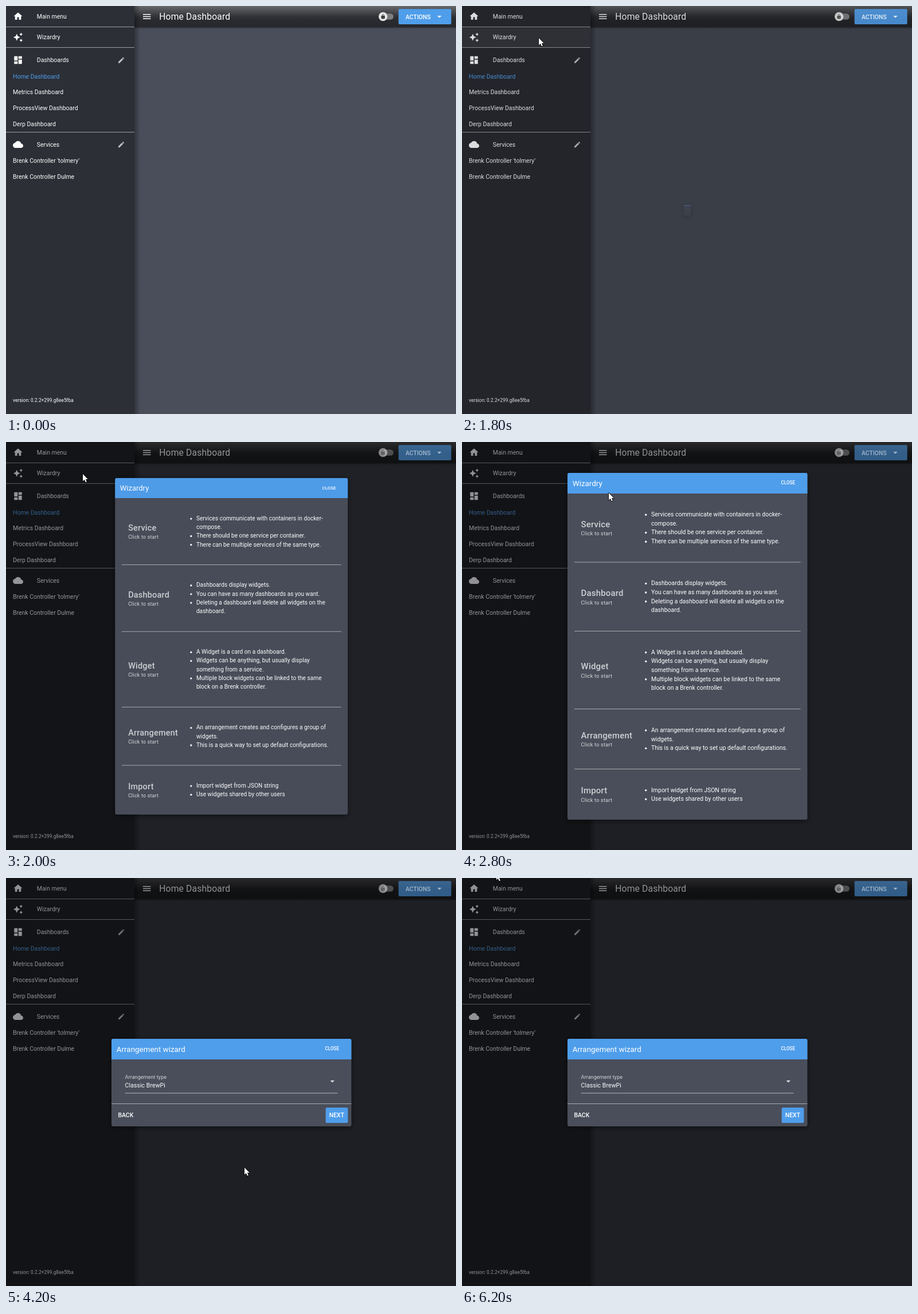
An HTML page with a canvas that plays this animation: 785 px wide and 713 px high, repeating every 6.3 s.

```html
<!DOCTYPE html>
<html lang="en">
<head>
<meta charset="utf-8">
<title>Dashboard wizard</title>
<style>
html, body { margin: 0; width: 100%; height: 100%; overflow: hidden; background: #494e5a; }
canvas { display: block; }
</style>
</head>
<body>
<canvas id="stage" width="785" height="713"></canvas>
<script>
const ctx = document.getElementById('stage').getContext('2d');
const W = 785, H = 713, LOOP = 6300, STEP = 100;
const BLUE = '#4f9eeb', PANEL = '#494e5a', SIDE = '#2c2f36', LINE = 'rgba(255,255,255,.53)';
const BODY = 10.46;

const icons = {
  home: 'M10 20v-6h4v6h5v-8h3L12 3 2 12h3v8z',
  magic: 'M19 9l1.25-2.75L23 5l-2.75-1.25L19 1l-1.25 2.75L15 5l2.75 1.25zM11.5 9.5L9 4 6.5 9.5 1 12l5.5 2.5L9 20l2.5-5.5L17 12zM19 15l-1.25 2.75L15 19l2.75 1.25L19 23l1.25-2.75L23 19l-2.75-1.25z',
  tiles: 'M3 13h8V3H3zM3 21h8v-6H3zM13 21h8V11h-8zM13 3v6h8V3z',
  cloud: 'M19.35 10.04C18.67 6.59 15.64 4 12 4 9.11 4 6.6 5.64 5.35 8.04 2.34 8.36 0 10.91 0 14c0 3.31 2.69 6 6 6h13c2.76 0 5-2.24 5-5 0-2.64-2.05-4.78-4.65-4.96z',
  pencil: 'M3 17.25V21h3.75L17.81 9.94l-3.75-3.75zM20.71 7.04c.39-.39.39-1.02 0-1.41l-2.34-2.34c-.39-.39-1.02-.39-1.41 0l-1.83 1.83 3.75 3.75z',
  menu: 'M3 18h18v-2H3zM3 13h18v-2H3zM3 6v2h18V6z',
  caret: 'M7 10l5 5 5-5z',
  lock: 'M18 8h-1V6a5 5 0 0 0-10 0v2H6a2 2 0 0 0-2 2v10a2 2 0 0 0 2 2h12a2 2 0 0 0 2-2V10a2 2 0 0 0-2-2zM8.9 8V6a3.1 3.1 0 0 1 6.2 0v2zM12 13a2 2 0 0 0 0 4 2 2 0 0 0 0-4z'
};
for (const name in icons) icons[name] = new Path2D(icons[name]);

const arrowShape = new Path2D('M0 0V12.4L2.8 9.8 4.8 14.3 6.9 13.4 5 9H8.8Z');
const handShape = new Path2D('M-1.6 8.4V1.3C-1.6-.5 1.2-.5 1.2 1.3V5.4C2 4.8 3 4.8 3.4 5.8 4.6 5.2 5.2 5.6 5.5 6.4 7 6 7.6 6.6 7.6 7.8V10.6C7.6 12.4 6.4 13 6.4 15H-.5C-.5 13-4.8 9.8-4.8 8.2-4.8 6.8-3 6.8-1.6 8.4Z');

const rows = [
  { name: 'Service', top: 90, bottom: 210, list: ['*Services communicate with containers in docker-', 'compose.', '*There should be one service per container.', '*There can be multiple services of the same type.'] },
  { name: 'Dashboard', top: 210, bottom: 330.4, list: ['*Dashboards display widgets.', '*You can have as many dashboards as you want.', '*Deleting a dashboard will delete all widgets on the', 'dashboard.'] },
  { name: 'Widget', top: 330.4, bottom: 466.4, list: ['*A Widget is a card on a dashboard.', '*Widgets can be anything, but usually display', 'something from a service.', '*Multiple block widgets can be linked to the same', 'block on a Brenk controller.'] },
  { name: 'Arrangement', top: 466.4, bottom: 571.5, list: ['*An arrangement creates and configures a group of', 'widgets.', '*This is a quick way to set up default configurations.'] },
  { name: 'Import', top: 571.5, bottom: 660, list: ['*Import widget from JSON string', '*Use widgets shared by other users'] }
];

// time, x, y, pointing hand
const cursorKeys = [
  [1100, 134, 56, 1], [1800, 134, 56, 0], [2800, 256, 89, 0], [2900, 288, 146, 1],
  [3100, 355, 321, 1], [3300, 394, 430, 1], [3400, 415, 497, 1], [3600, 416, 506, 1],
  [4200, 416, 506, 0], [5000, 429, 492, 0], [5100, 439, 480, 0], [5300, 385, 398, 0],
  [5500, 305, 304, 0], [5700, 230, 189, 0], [5900, 134, 70, 0], [6200, 60, -9, 0]
];

// time, backdrop, dialog scale, dialog opacity
const openKeys = [[0, 0, 0, 0], [1800, .35, .03, .4], [1900, .83, .82, .92], [2000, .97, .97, .98], [2100, 1, 1, 1]];

const at = (keys, t) => keys.filter(k => k[0] <= t).pop();
const ramp = (t, a, b) => Math.min(1, Math.max(0, (t - a) / (b - a)));

function rect(x, y, w, h, fill, r = 0) {
  ctx.fillStyle = fill;
  ctx.beginPath();
  ctx.roundRect(x, y, w, h, r);
  ctx.fill();
}

// y is the middle of the capitals
function text(s, x, y, size = BODY, { color = '#fff', weight = 400, gap = 0 } = {}) {
  ctx.font = `${weight} ${size}px Roboto, sans-serif`;
  ctx.letterSpacing = gap + 'px';
  ctx.fillStyle = color;
  ctx.fillText(s, x, y + size * .355);
}

function icon(name, x, y, size = 18, color = '#fff') {
  ctx.save();
  ctx.translate(x - size / 2, y - size / 2);
  ctx.scale(size / 24, size / 24);
  ctx.fillStyle = color;
  ctx.fill(icons[name], 'evenodd');
  ctx.restore();
}

function gradient(x0, y0, x1, y1, ...stops) {
  const g = ctx.createLinearGradient(x0, y0, x1, y1);
  stops.forEach(([p, c]) => g.addColorStop(p, c));
  return g;
}

function backgrounds(t) {
  rect(0, 0, W, H, PANEL);
  rect(224, 37, W - 224, 4, gradient(0, 37, 0, 41, [0, 'rgba(0,0,0,.2)'], [1, 'rgba(0,0,0,0)']));
  rect(224, 0, W - 224, 37.5, gradient(0, 0, 0, 37, [0, '#67686c'], [.5, '#303236'], [.65, '#292b2f'], [1, '#26282d']));
  rect(224, 0, 10, H, gradient(224, 0, 234, 0, [0, 'rgba(0,0,0,.32)'], [1, 'rgba(0,0,0,0)']));
  rect(0, 0, 224, H, SIDE);
  const main = ramp(t, 400, 700) * (1 - ramp(t, 700, 1000));
  const wizard = t < 1800 ? ramp(t, 700, 1100) : t < 1900 ? .5 : 0;
  rect(0, 0, 224, 36, `rgba(255,255,255,${.13 * main})`);
  rect(0, 37, 224, 35, `rgba(255,255,255,${.13 * wizard})`);
}

function foreground() {
  for (const y of [36, 72, 220]) rect(0, y, 224, 1, LINE);
  const heads = [['home', 'Main menu', 18], ['magic', 'Wizardry', 54.7], ['tiles', 'Dashboards', 94.5], ['cloud', 'Services', 242]];
  for (const [name, label, y] of heads) {
    icon(name, 21, y);
    text(label, 53.8, y);
  }
  icon('pencil', 201, 94.7, 13.4, '#c4c5c7');
  icon('pencil', 201, 242.2, 13.4, '#c4c5c7');
  text('Home Dashboard', 12, 123, BODY, { color: BLUE });
  text('Metrics Dashboard', 12, 150.6);
  text('ProcessView Dashboard', 12, 178.3);
  text('Derp Dashboard', 12, 206);
  text("Brenk Controller 'tolmery'", 12, 270.4);
  text('Brenk Controller Dulme', 12, 298);
  text('version: 0.2.2+299.g8ee5fba', 12, 689.2, 8.37);

  icon('menu', 245.7, 18.6);
  text('Home Dashboard', 267.2, 18.8, 15.69, { gap: .157 });
  rect(656, 13.3, 20, 10.4, '#7c7d7f', 5.2);
  rect(650, 10.8, 15.4, 15.4, '#e6e6e6', 7.7);
  icon('lock', 657.7, 18.4, 9, '#222');
  rect(684.7, 5.2, 92, 26.8, BLUE, 2);
  text('ACTIONS', 697, 18.9, BODY, { weight: 500 });
  icon('caret', 756, 18.5);
}

function panel(top, bottom, title) {
  ctx.save();
  ctx.shadowColor = 'rgba(0,0,0,.5)';
  ctx.shadowBlur = 10;
  ctx.shadowOffsetY = 2;
  rect(184, top, 418.5, bottom - top, PANEL, 3);
  ctx.restore();
  rect(184, top, 418.5, 36, BLUE, [3, 3, 0, 0]);
  text(title, 192.8, top + 18.2, 13.4);
  text('CLOSE', 556.5, top + 17.3, 8.15, { weight: 500 });
}

function chooser() {
  panel(54, 660, 'Wizardry');
  for (const { name, top, bottom, list } of rows) {
    const mid = (top + bottom) / 2;
    text(name, 207.6, mid - 6.6, 14.94, { weight: 500, gap: .187, color: '#cfd0d4' });
    text('Click to start', 207.6, mid + 10.3, 8.96, { gap: .3, color: '#dcdde0' });
    list.forEach((line, i) => {
      const y = mid + (i - (list.length - 1) / 2) * 15.69 - .1;
      if (line[0] === '*') rect(319, y - .9, 3.4, 3.4, '#fff', 1.7);
      text(line.replace('*', ''), 330, y);
    });
    if (bottom < 660) rect(196, Math.floor(bottom) - (bottom === 210 ? .5 : 0), 394.5, 1, LINE);
  }
}

function arrangement() {
  panel(281, 434, 'Arrangement wizard');
  text('Arrangement type', 207.6, 347.4, 8.96, { gap: .1, color: '#d4d5d9' });
  text('Classic BrewPi', 207.6, 362.5, BODY, { gap: .1 });
  icon('caret', 569.3, 355.3, 18, '#dcdde0');
  rect(207.6, 375.6, 370.8, 1, 'rgba(255,255,255,.6)');
  rect(184, 394, 418.5, 1, LINE);
  text('BACK', 195.4, 414.7, BODY, { weight: 500 });
  rect(557.6, 401.3, 38.8, 26.6, BLUE, 2);
  text('NEXT', 563.7, 414.7, BODY, { weight: 500 });
}

function cursor(t) {
  if (t < 500) return;
  let [, x, y, hand] = at(cursorKeys, t) || [];
  if (t < 1100) {
    const p = 1 - (1 - ramp(t, 400, 1100)) ** 2;
    x = 60 + 74 * p;
    y = -9 + 65 * p;
    hand = 1;
  }
  ctx.save();
  ctx.translate(x, y);
  ctx.lineJoin = 'round';
  if (hand) {
    ctx.fillStyle = '#35363a';
    ctx.fill(handShape);
    ctx.strokeStyle = '#fff';
    ctx.lineWidth = 1;
    ctx.stroke(handShape);
  } else {
    ctx.strokeStyle = '#000';
    ctx.lineWidth = 1.6;
    ctx.stroke(arrowShape);
    ctx.fillStyle = '#fff';
    ctx.fill(arrowShape);
  }
  ctx.restore();
}

function draw(t) {
  const [, dim, scale, alpha] = at(openKeys, t);
  backgrounds(t);
  rect(0, 0, W, H, `rgba(0,0,0,${.6 * dim})`);
  ctx.globalAlpha = 1 - .46 * dim;
  foreground();
  ctx.globalAlpha = alpha;
  if (scale) {
    ctx.save();
    ctx.translate(393.2, 357);
    ctx.scale(scale, scale);
    ctx.translate(-393.2, -357);
    t < 4200 ? chooser() : arrangement();
    ctx.restore();
  }
  ctx.globalAlpha = 1;
  cursor(t);
}

const start = performance.now();
function tick(now) {
  const t = Math.max(0, now - start) % LOOP;
  draw(Math.floor(t / STEP) * STEP);
  requestAnimationFrame(tick);
}
draw(0);
requestAnimationFrame(tick);
</script>
</body>
</html>
```
